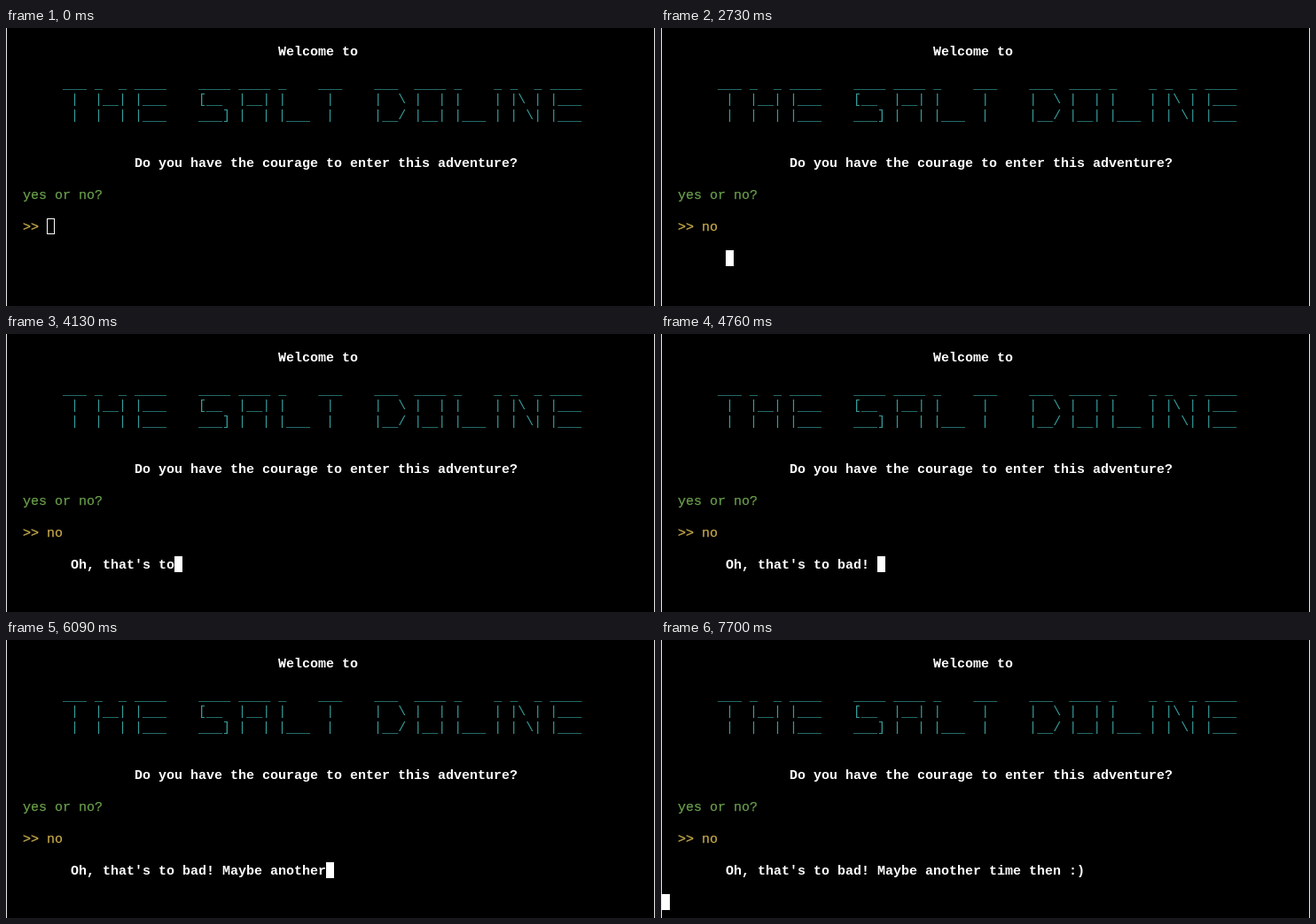
Write an HTML page that moves like this. It is 732 px wide and 314 px high and loops after 7.98 s.

```html
<!DOCTYPE html>
<html lang="en">
<head>
<meta charset="utf-8">
<title>Terminal adventure</title>
<style>
  html, body { margin: 0; width: 100%; height: 100%; overflow: hidden; background: #000; }
  body { position: relative; box-sizing: border-box; border: solid #e8e8e8; border-width: 0 1px; }
  pre {
    position: absolute; left: 0; top: 19px; margin: 0;
    font: 15px/18px "Liberation Mono", monospace; color: #fff;
  }
  b { font-weight: 700; }
  .title { color: #359a98; }
  .title i { position: relative; top: 1px; font-style: normal; }
  .question { color: #6a9f4b; }
  .prompt { color: #c9ac4c; }
  .question, .prompt { -webkit-text-stroke: 0.25px; }
  #cursor { position: absolute; box-sizing: border-box; width: 9px; height: 18px; border: 1px solid #fff; }
</style>
</head>
<body>
<pre id="screen"></pre>
<div id="cursor"></div>
<script>
const LOOP = 7980, TICK = 70;
const CELL_W = 9, CELL_H = 18, TOP = 17;
const PROMPT_ROW = 11, REPLY_ROW = 13, INDENT = 8;
const REPLY = "Oh, that's to bad! Maybe another time then :)";

// Three-line letters, rows separated by commas
const LETTERS = {
  T: "___, | , | ",
  H: "_  _,|__|,|  |",
  E: "____,|___,|___",
  S: "____,[__ ,___]",
  A: "____,|__|,|  |",
  L: "_   ,|   ,|___",
  D: "___ ,|  \\,|__/",
  O: "____,|  |,|__|",
  I: "_,|,|",
  N: "_  _,|\\ |,| \\|",
  " ": "  ,  ,  "
};

const indent = (columns, text) => " ".repeat(columns) + text;

// Underscores are wrapped so that they can sit slightly below the bars.
const banner = text => [0, 1, 2].map(row =>
  indent(7, [...text].map(letter => LETTERS[letter].split(",")[row]).join(" "))
).join("\n").replace(/_+/g, "<i>$&</i>");

const screen = document.getElementById("screen");
const cursor = document.getElementById("cursor");

screen.innerHTML = [
  `<b>${indent(34, "Welcome to")}</b>\n`,
  `<span class="title">${banner("THE SALT DOLINE")}</span>\n\n`,
  `<b>${indent(16, "Do you have the courage to enter this adventure?")}</b>\n`,
  `<span class="question">${indent(2, "yes or no?")}</span>\n`,
  `<span class="prompt">${indent(2, "&gt;&gt; ")}<span id="answer"></span></span>\n`,
  `<b>${indent(INDENT, "")}<span id="reply"></span></b>`
].join("\n");

const answer = document.getElementById("answer");
const reply = document.getElementById("reply");

// Steps -1 and 0 are a line break and a tab; two line breaks follow the reply.
const stepTime = step => Math.floor((2870 + 105 * (step - 1)) / TICK) * TICK;

function stepAt(time) {
  let step = -2;
  while (step < REPLY.length + 2 && stepTime(step + 1) <= time) step++;
  return step;
}

function cursorCell(step, answerLength) {
  if (step < -1) return [5 + answerLength, PROMPT_ROW];
  if (step < 0) return [0, REPLY_ROW];
  if (step <= REPLY.length) return [INDENT + step, REPLY_ROW];
  return [0, REPLY_ROW + step - REPLY.length];
}

function draw(now) {
  const time = now % LOOP;
  const answerLength = (time >= 1820) + (time >= 2100);
  const step = stepAt(time);
  const [column, row] = cursorCell(step, answerLength);

  answer.textContent = "no".slice(0, answerLength);
  reply.textContent = REPLY.slice(0, Math.max(0, step));
  cursor.style.left = column * CELL_W + "px";
  cursor.style.top = TOP + row * CELL_H + "px";
  cursor.style.background = time < 840 ? "none" : "#fff";
}

const start = performance.now();
function animate() {
  draw(performance.now() - start);
  requestAnimationFrame(animate);
}
animate();
</script>
</body>
</html>
```
